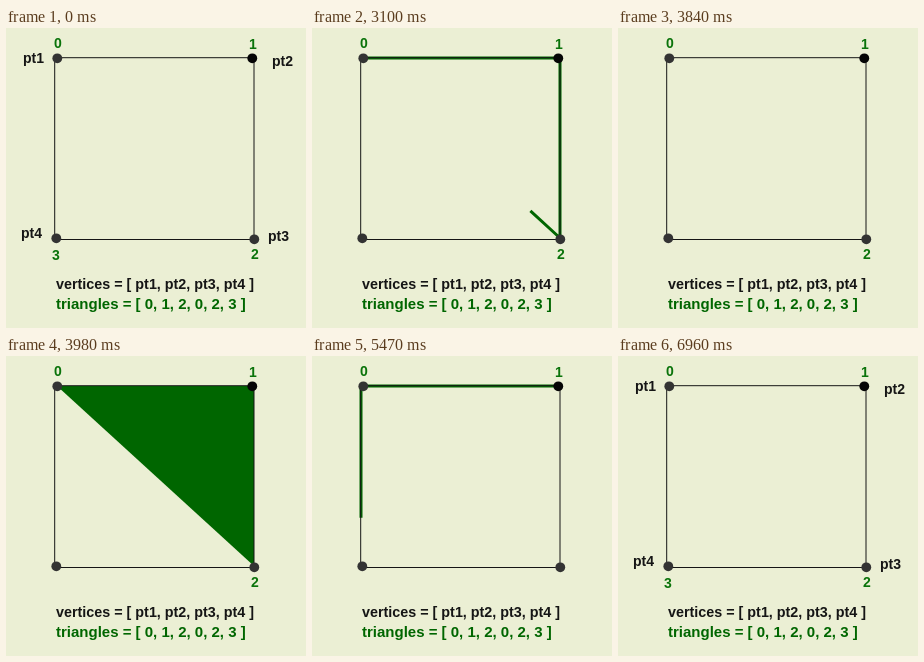
Recreate the animation shown at these times as an HTML page with a canvas. Size 300 by 300 pixels, loop 7.99 s.

```html
<!DOCTYPE html>
<html lang="en">
<head>
<meta charset="utf-8">
<title>Triangle indices</title>
<style>
  html, body { margin: 0; width: 100%; height: 100%; overflow: hidden; background: #ebefd4; }
  canvas { display: block; }
</style>
</head>
<body>
<canvas id="stage" width="300" height="300"></canvas>
<script>
const ctx = document.getElementById('stage').getContext('2d');
const LOOP = 7990, TICK = 148;
const BACK = '#ebefd4', GREEN = '#006600', LABEL = '#0a730a', INK = '#151515';

const corners = [
  { dot: [51, 30], number: [48, 20], name: [17, 35] },
  { dot: [246, 30], number: [243, 21], name: [266, 38], color: '#050505' },
  { dot: [248, 211], number: [245, 231], name: [262, 213] },
  { dot: [50, 210], number: [46, 232], name: [15, 210] }
];

// edges: when the pen leaves each point and when it reaches the next one.
const triangles = [
  {
    start: 2510, fill: 3540, end: 4280, blink: [3840, 3980],
    order: [0, 1, 2],
    points: [[51, 30], [248, 30], [248, 210]],
    edges: [[2458, 2731], [2665, 3100], [3050, 3396]]
  },
  {
    start: 4730, fill: 6210, end: 6960, blink: [0, 0],
    order: [1, 0, 3],
    points: [[246, 30], [49, 30], [49, 208]],
    edges: [[4610, 5140], [5070, 5610], [5590, 6210]]
  }
];

const progress = ([from, to], t) => Math.min(1, Math.max(0, (t - from) / (to - from)));
const within = ([from, to], t) => t >= from && t < to;

function text(string, [x, y], color, size = 14) {
  ctx.font = `bold ${size}px "Liberation Sans", Arial, sans-serif`;
  ctx.fillStyle = color;
  ctx.fillText(string, x, y);
}

function drawNumber(i) {
  text(String(i), corners[i].number, LABEL);
}

function drawFill({ points }) {
  ctx.beginPath();
  for (const [x, y] of points) ctx.lineTo(x, y);
  ctx.fillStyle = GREEN;
  ctx.fill();
}

function drawEdges({ points }, grown) {
  ctx.strokeStyle = GREEN;
  ctx.lineWidth = 3;
  ctx.lineJoin = 'round';
  ctx.beginPath();
  ctx.moveTo(...points[0]);
  grown.forEach((p, i) => {
    const [x, y] = points[i], [nextX, nextY] = points[(i + 1) % 3];
    if (p > 0) ctx.lineTo(x + (nextX - x) * p, y + (nextY - y) * p);
  });
  ctx.stroke();
}

function drawSquare() {
  ctx.strokeStyle = INK;
  ctx.lineWidth = 1;
  ctx.strokeRect(48.7, 29.7, 199.3, 181.8);
  for (const { dot: [x, y], color = '#333' } of corners) {
    ctx.beginPath();
    ctx.arc(x + 0.3, y + 0.3, 4.9, 0, Math.PI * 2);
    ctx.fillStyle = color;
    ctx.fill();
  }
}

function draw(t) {
  ctx.fillStyle = BACK;
  ctx.fillRect(0, 0, 300, 300);

  const active = triangles.find(({ start, end }) => within([start, end], t));
  if (active) {
    // The pen moves in visible steps.
    const stepped = active.start + Math.floor((t - active.start + 8) / TICK) * TICK;
    const grown = active.edges.map(edge => progress(edge, stepped));
    if (t < active.fill) drawEdges(active, grown);
    else if (!within(active.blink, t)) drawFill(active);
    drawSquare();
    active.order.forEach((corner, i) => grown[i] > 0 && drawNumber(corner));
  } else {
    drawSquare();
    if (!within([2070, 6960], t)) {
      corners.forEach(({ name }, i) => {
        drawNumber(i);
        text(`pt${i + 1}`, name, INK);
      });
    }
  }

  text('vertices = [ pt1, pt2, pt3, pt4 ]', [50, 261], INK, 14.35);
  text('triangles = [ 0, 1, 2, 0, 2, 3 ]', [50, 281], GREEN, 15);
}

function frame() {
  draw(performance.now() % LOOP);
  requestAnimationFrame(frame);
}
frame();
</script>
</body>
</html>
```
